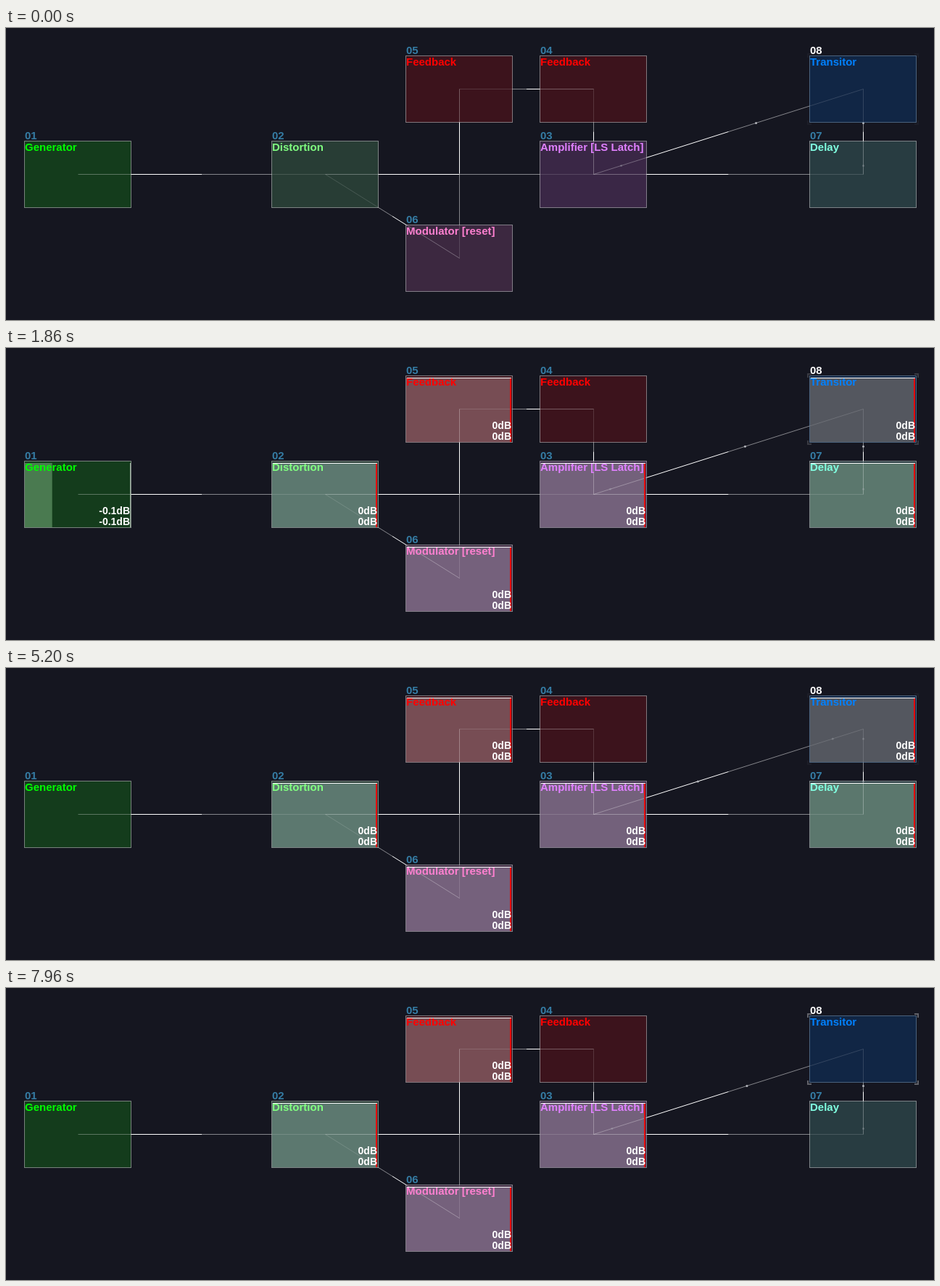
An HTML page with a canvas for the animation above (8000 ms loop, 1280 px wide and 404 px high).

```html
<!DOCTYPE html>
<html lang="en">
<head>
<meta charset="utf-8">
<title>Module graph</title>
<style>
html, body { margin: 0; width: 100%; height: 100%; overflow: hidden; background: #151620; }
canvas { display: block; width: 1280px; height: 404px; }
</style>
</head>
<body>
<canvas id="stage" width="1280" height="404"></canvas>
<script>
const ctx = document.getElementById('stage').getContext('2d');
const LOOP = 8000, W = 147, H = 92;
const FONT = '"Liberation Sans", Arial, sans-serif';
const START = 1500;      // the signal arrives
const GEN_OFF = 4500;    // generator peak mark expires
const TAIL = 6555;       // delay and last module start to fall
const TAIL_OFF = 7750;   // their clip marks expire
const FALL = 2.05 / 1000;

const COL = [25.5, 366.5, 551.5, 736.5, 1108.5];
const ROW = [38.5, 156.5, 272.5];

const mod = (name, col, row, color, base, lit, kind) =>
  ({ name, x: COL[col], y: ROW[row], color, base, lit, kind });

const mods = [
  mod('Generator', 0, 1, '#00ff00', '#143c1c', '#4a7a50', 'pulse'),
  mod('Distortion', 1, 1, '#80ff80', '#283d35', '#5c786f', 'full'),
  mod('Amplifier [LS Latch]', 3, 1, '#e080ff', '#3a2746', '#73617b', 'full'),
  mod('Feedback', 3, 0, '#ff0000', '#3c131c', '#774d54', 'idle'),
  mod('Feedback', 2, 0, '#ff0000', '#3c131c', '#774d54', 'full'),
  mod('Modulator [reset]', 2, 2, '#ff80d0', '#3c2840', '#75617c', 'full'),
  mod('Delay', 4, 1, '#80ffe0', '#283c41', '#5b776d', 'tail'),
  mod('Transitor', 4, 0, '#0080ff', '#112645', '#54575f', 'tail')
];

// from, to, carries moving dots
const links = [
  [1, 2], [2, 3], [3, 7], [7, 8, true], [3, 8, true],
  [3, 4], [4, 5], [5, 6], [6, 2]
];

const center = n => [mods[n - 1].x + 74, mods[n - 1].y + 46];
const mix = (a, b, k) => [a[0] + (b[0] - a[0]) * k, a[1] + (b[1] - a[1]) * k];
const clamp = v => Math.max(0, Math.min(1, v));

function line(a, b, color) {
  ctx.strokeStyle = color;
  ctx.lineWidth = 1;
  ctx.beginPath();
  ctx.moveTo(...a);
  ctx.lineTo(...b);
  ctx.stroke();
}

function rect(x, y, w, h, color) {
  ctx.fillStyle = color;
  ctx.fillRect(x, y, w, h);
}

function text(str, x, y, color, size, align = 'left') {
  ctx.font = `bold ${size}px ${FONT}`;
  ctx.textAlign = align;
  ctx.fillStyle = color;
  ctx.fillText(str, x, y);
}

function drawLinks(t) {
  for (const [from, to] of links) {
    const a = center(from), b = center(to), m = mix(a, b, 0.5);
    line(m, b, 'rgba(255,255,255,0.48)');
    line(a, m, '#ffffff');
  }
  const phase = (0.102 + t * 0.000247) % 0.5;
  ctx.fillStyle = '#b4b6bc';
  for (const [from, to, dots] of links) {
    if (!dots) continue;
    for (const k of [phase, phase + 0.5]) {
      const [x, y] = mix(center(from), center(to), k);
      ctx.beginPath();
      ctx.arc(x, y, 1.5, 0, Math.PI * 2);
      ctx.fill();
    }
  }
}

// level 0..1, peak text and clip state of one module
function meter(kind, t) {
  if (t < START || kind === 'idle') return { level: 0 };
  if (kind === 'pulse') {
    return { level: clamp(1 - (t - START) * FALL), peak: t < GEN_OFF ? '-0.1dB' : '' };
  }
  if (kind === 'full') return { level: 1, peak: '0dB', clip: true };
  const on = t < TAIL_OFF;
  return { level: clamp(1 - (t - TAIL) * FALL), peak: on ? '0dB' : '', clip: on };
}

function drawBox(m, state) {
  rect(m.x, m.y, W, H, m.base);
  if (state.level > 0) rect(m.x + 0.5, m.y + 2.5, 145 * state.level, H - 3, m.lit);
}

function drawFace(m, i, state) {
  ctx.strokeStyle = i === 7 ? 'rgba(130,165,200,0.5)' : 'rgba(255,255,255,0.42)';
  ctx.lineWidth = 1;
  ctx.strokeRect(m.x, m.y, W, H);
  text('0' + (i + 1), m.x + 0.5, m.y - 2.5, i === 7 ? '#ffffff' : '#357ca4', 15);
  text(m.name, m.x + 0.5, m.y + 13, m.color, 15);
  if (state.clip) {
    rect(m.x + 143.5, m.y + 2.5, 2, H - 3, '#e60c0c');
    if (state.level === 1) rect(m.x + 1.5, m.y + 2.5, 144, 1, '#ffffff');
  }
  if (state.peak) {
    if (!state.clip) rect(m.x + 145.5, m.y + 2.5, 1, H - 3, '#a4b4a6');
    text(state.peak, m.x + 145.5, m.y + 73.5, '#ffffff', 14, 'right');
    text(state.peak, m.x + 145.5, m.y + 88, '#ffffff', 14, 'right');
  }
}

// blinking corners around the selected module
function drawCorners(m, t) {
  const glow = (1 - Math.cos((t - 4170) * 0.006)) / 2;
  const l = m.x - 2.5, r = m.x + W + 2.5, u = m.y - 2.5, d = m.y + H + 2.5;
  ctx.strokeStyle = `rgba(255,255,255,${0.03 + 0.34 * glow})`;
  ctx.lineWidth = 2;
  ctx.beginPath();
  for (const [x, sx] of [[l, 1], [r, -1]]) {
    for (const [y, sy] of [[u, 1], [d, -1]]) {
      ctx.moveTo(x + 5 * sx, y);
      ctx.lineTo(x, y);
      ctx.lineTo(x, y + 5 * sy);
    }
  }
  ctx.stroke();
}

function draw(t) {
  rect(0, 0, 1280, 404, '#151620');
  drawLinks(t);

  const states = mods.map(m => meter(m.kind, t));
  mods.forEach((m, i) => drawBox(m, states[i]));

  // links shine faintly through the boxes
  ctx.save();
  ctx.beginPath();
  mods.forEach(m => ctx.rect(m.x, m.y, W, H));
  ctx.clip();
  ctx.globalAlpha = 0.3;
  drawLinks(t);
  ctx.restore();

  mods.forEach((m, i) => drawFace(m, i, states[i]));
  drawCorners(mods[7], t);
}

const begin = performance.now();
function tick() {
  draw((performance.now() - begin) % LOOP);
  requestAnimationFrame(tick);
}
tick();
</script>
</body>
</html>
```
